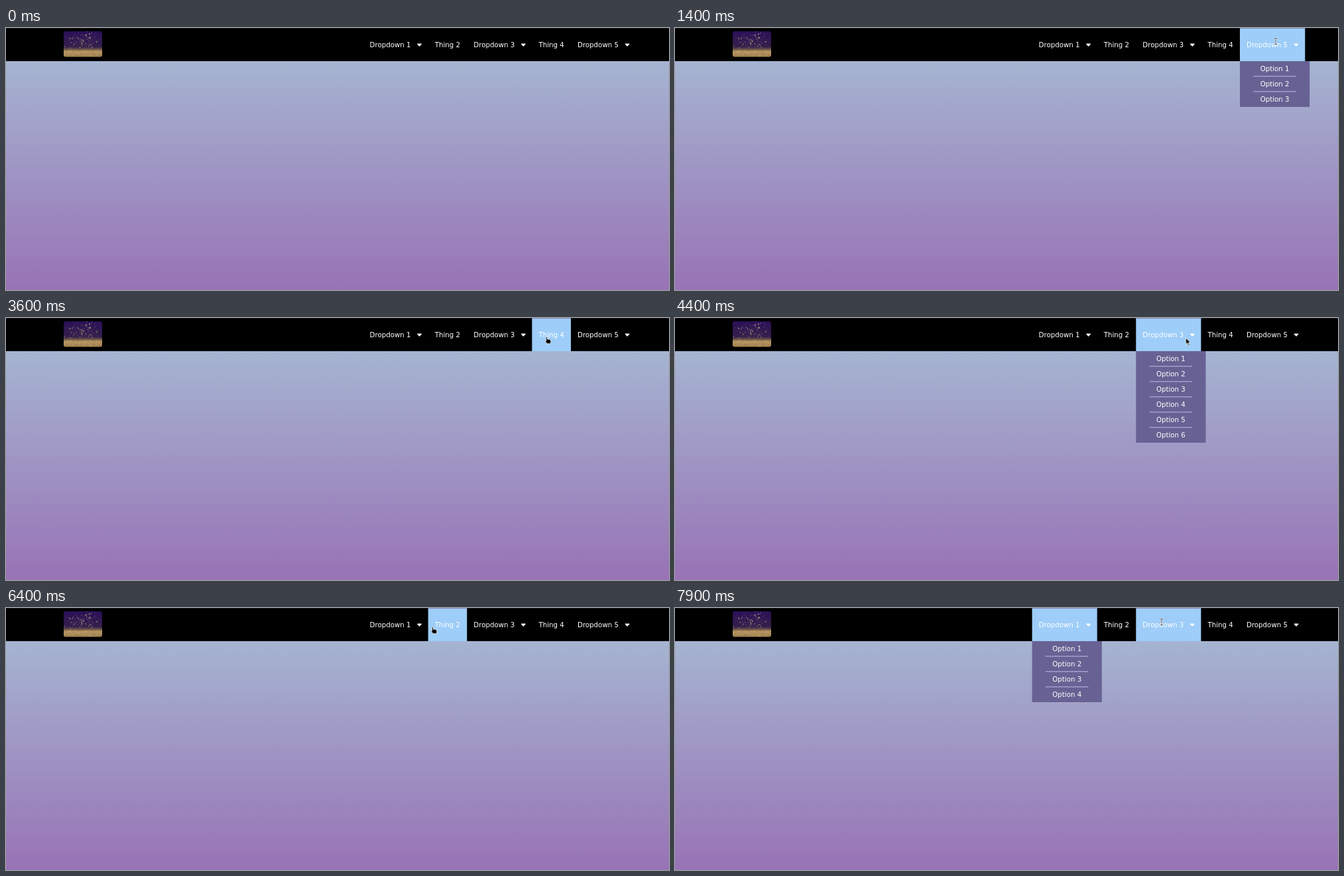
An HTML page for the animation above (8000 ms loop, 1000 by 395 pixels).

```html
<!DOCTYPE html>
<html lang="en">
<head>
<meta charset="utf-8">
<title>Dropdown navigation</title>
<style>
html, body { margin: 0; width: 100%; height: 100%; overflow: hidden; background: #9873b5; }
#stage { display: block; width: 1000px; height: 395px; }
text { font: 10.24px "DejaVu Sans", Verdana, sans-serif; fill: #fff; white-space: pre; }
.caret { fill: #fff; stroke: #fff; stroke-width: 1.2; stroke-linejoin: round; }

/* 100 ms is 1.25% of the loop */
.anim { animation: 8s step-end -15ms infinite; }
.hover { visibility: hidden; }
.menu { position: absolute; left: 0; top: 50px; width: 1000px; height: 0; overflow: hidden; }
.pointer { visibility: hidden; }

.hover1 { animation-name: hover1; }
.hover2 { animation-name: hover2; }
.hover3 { animation-name: hover3; }
.hover4 { animation-name: hover4; }
.hover5 { animation-name: hover5; }
@keyframes hover1 { 81.25%, 100% { visibility: visible } }
@keyframes hover2 {
  78.75%, 96.25% { visibility: visible }
  81.25%, 97.5% { visibility: hidden }
}
@keyframes hover3 {
  46.25%, 97.5%, 100% { visibility: visible }
  78.75% { visibility: hidden }
}
@keyframes hover4 { 45% { visibility: visible } 46.25% { visibility: hidden } }
@keyframes hover5 { 7.5% { visibility: visible } 45% { visibility: hidden } }

.menu1 { animation-name: menu1; }
.menu3 { animation-name: menu3; }
.menu5 { animation-name: menu5; }
@keyframes menu1 { 86.25%, 100% { height: 92px } }
@keyframes menu3 {
  53.75% { height: 60px }
  55% { height: 138px }
  70% { height: 114px }
  71.25% { height: 66px }
  72.5% { height: 20px }
  73.75% { height: 0 }
}
@keyframes menu5 {
  16.25% { height: 34px }
  17.5% { height: 69px }
  33.75% { height: 56px }
  35% { height: 24px }
  36.25% { height: 0 }
}

.cursor { animation-name: travel; }
@keyframes travel {
  0% { transform: translate(-50px, -50px) }
  7.5% { transform: translate(918px, 4px) }
  8.75% { transform: translate(909px, 14px) }
  10% { transform: translate(906px, 20px) }
  45% { transform: translate(815px, 28px) }
  46.25% { transform: translate(786px, 30px) }
  47.5% { transform: translate(776px, 30px) }
  48.75% { transform: translate(772px, 30px) }
  50% { transform: translate(770.5px, 30px) }
  77.5% { transform: translate(748px, 30px) }
  78.75% { transform: translate(682px, 29px) }
  80% { transform: translate(643px, 28px) }
  81.25% { transform: translate(622px, 26px) }
  82.5% { transform: translate(612px, 24px) }
  95% { transform: translate(626px, 24px) }
  96.25% { transform: translate(664px, 22px) }
  97.5% { transform: translate(716px, 21px) }
  98.75%, 100% { transform: translate(734px, 21px) }
}
.arrow { animation-name: arrow; }
.hand { animation-name: hand; }
.beam { animation-name: beam; }
@keyframes arrow {
  0%, 46.25%, 81.25% { visibility: visible }
  10%, 78.75%, 96.25%, 100% { visibility: hidden }
}
@keyframes hand {
  45%, 78.75%, 96.25% { visibility: visible }
  46.25%, 81.25%, 97.5% { visibility: hidden }
}
@keyframes beam {
  10%, 97.5%, 100% { visibility: visible }
  45% { visibility: hidden }
}
</style>
</head>
<body>
<svg id="stage" viewBox="0 0 1000 395">
  <defs>
    <linearGradient id="sky" x2="0" y2="1">
      <stop stop-color="#a5b4d1"/>
      <stop offset="1" stop-color="#9873b5"/>
    </linearGradient>
    <linearGradient id="night" x2="0" y2="1">
      <stop stop-color="#2a0f58"/>
      <stop offset=".6" stop-color="#33204c"/>
      <stop offset=".7" stop-color="#6f5648"/>
      <stop offset=".78" stop-color="#b8985f"/>
      <stop offset="1" stop-color="#a08052"/>
    </linearGradient>
    <clipPath id="frame"><rect x="87" y="5" width="58" height="38.6" rx="3"/></clipPath>
  </defs>
  <rect y="50" width="1000" height="345" fill="url(#sky)"/>
  <rect width="1000" height="50"/>
  <rect width="1000" height=".8" fill="#1a1a1c"/>
  <g clip-path="url(#frame)">
    <rect x="87" y="5" width="58" height="39" fill="url(#night)"/>
    <g id="glitter"></g>
  </g>
  <g id="nav"></g>
  <g class="cursor anim">
    <path class="pointer arrow anim" d="M0 0V9.6L2.2 7.7L3.8 11.4L5.5 10.7L3.9 7.1H6.8Z"
      stroke="#fff" stroke-width=".8" stroke-linejoin="round"/>
    <path class="pointer hand anim" d="M-.9 .8Q0-.6 1 .8L1.5 4Q4.5 3.7 6.6 5.2Q7.4 7 6.4 10.8H1.2Q-.6 8.6-2 6.8Q-1.8 5.4-.2 6.4Z"
      stroke="#fff" stroke-width=".8" stroke-linejoin="round"/>
    <g class="pointer beam anim" fill="none">
      <path d="M-2-4.5H2M0-4.5V4.5M-2 4.5H2" stroke="#fff" stroke-width="2"/>
      <path d="M-1.8-4.5H1.8M0-4.5V4.5M-1.8 4.5H1.8" stroke="#5c4f5c"/>
    </g>
  </g>
</svg>
<script>
const items = [
  { label: 'Dropdown 1', x: 538.6, options: 4 },
  { label: 'Thing 2', x: 636.7 },
  { label: 'Dropdown 3', x: 695.3, options: 6 },
  { label: 'Thing 4', x: 793.4 },
  { label: 'Dropdown 5', x: 852, options: 3 }
];
const end = 950.3, row = 23.05, menuWidth = 105.2;

function navItem({ label, x, options }, i) {
  const width = (items[i + 1] ? items[i + 1].x : end) - x;
  const caret = options ? `<path class="caret" d="M${x + 82.2} 24.2h5.6l-2.8 2.8z"/>` : '';
  return `<g class="hover hover${i + 1} anim">
      <rect x="${x}" width="${width}" height="50" fill="#9dcdf8"/>
      <rect x="${x}" width="${width}" height="1" fill="#8c8ab8"/>
    </g>
    <text x="${x + 10}" y="28.8">${label}</text>${caret}`;
}

function menu({ x, options }, i) {
  if (!options) return '';
  let rows = '';
  for (let k = 0; k < options; k++) {
    const y = k * row;
    rows += `<text x="${x + menuWidth / 2}" y="${y + 15.1}" text-anchor="middle">Option ${k + 1}</text>`;
    if (k < options - 1)
      rows += `<rect x="${x + 20.4}" y="${y + 22.1}" width="64.4" height="1.3" fill="#aaa9d8"/>`;
  }
  return `<svg class="menu menu${i + 1} anim">
    <rect x="${x}" width="${menuWidth}" height="${options * row}" fill="#676293"/>${rows}</svg>`;
}

document.getElementById('nav').innerHTML = items.map(navItem).join('');
document.body.insertAdjacentHTML('beforeend', items.map(menu).join(''));

// Seeded sparkle for the small night picture
let seed = 7;
const rand = () => (seed = seed * 16807 % 2147483647) / 2147483647;
const spread = () => rand() + rand() - 1;
const dot = (x, y, r, fill, opacity) =>
  `<circle cx="${x}" cy="${y}" r="${r}" fill="${fill}" opacity="${opacity}"/>`;
let dots = '';
for (let i = 0; i < 240; i++) {
  dots += dot(116 + spread() * 29, 18 + spread() * 15, .25 + rand() ** 5 * .8, '#d9bd84', .3 + rand() * .5);
  dots += dot(87 + rand() * 58, 33 + rand() * 11, .5, rand() < .5 ? '#d6b67c' : '#7c6040', .4);
}
document.getElementById('glitter').innerHTML = dots;
</script>
</body>
</html>
```
